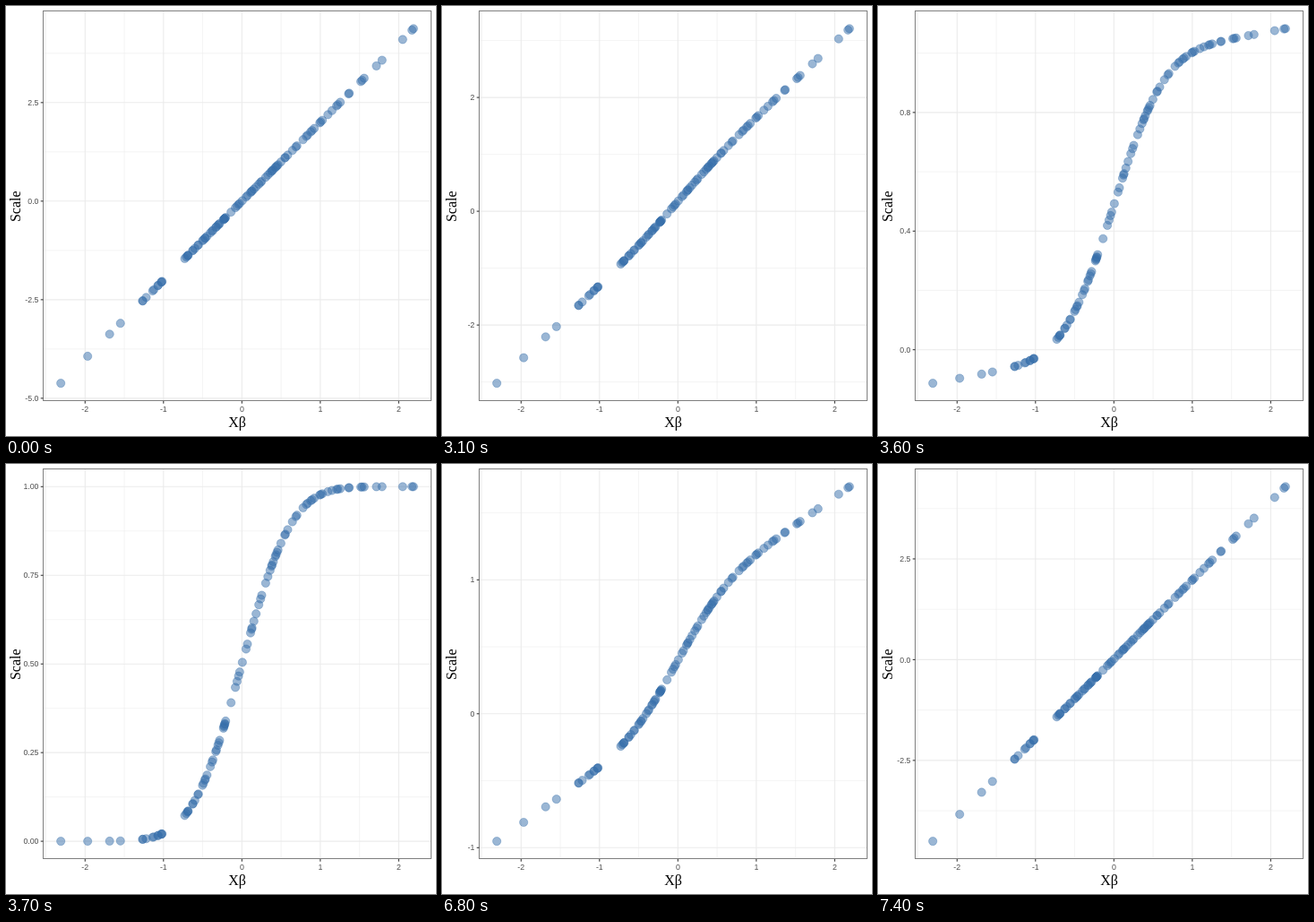
These frames come from a looping animation (480x480 px, 7.5 s). An HTML page with a canvas:

```html
<!DOCTYPE html>
<html lang="en">
<head>
<meta charset="utf-8">
<title>Link scale</title>
<style>
  html, body { margin: 0; width: 100%; height: 100%; overflow: hidden; background: #fff; }
  canvas { display: block; width: 480px; height: 480px; }
</style>
</head>
<body>
<canvas id="plot" width="480" height="480"></canvas>
<script>
const ctx = document.getElementById('plot').getContext('2d');
const panel = { left: 41.5, top: 5.5, right: 474.5, bottom: 440.9 };
const TICK = 2.75;
const STEP_MS = 100, CYCLE = 75, MORPH = 10;

// Seeded Mersenne Twister; the first 227 draws need no wrap-around
function makeRandom(seed) {
  const next = () => (seed = (Math.imul(69069, seed) + 1) >>> 0);
  for (let i = 0; i < 51; i++) next();
  const mt = Array.from({ length: 624 }, next);
  let i = 0;
  return () => {
    const y = (mt[i] & 0x80000000) | (mt[i + 1] & 0x7fffffff);
    let v = mt[i + 397] ^ (y >>> 1) ^ (y & 1 ? 0x9908b0df : 0);
    i++;
    v ^= v >>> 11;
    v ^= (v << 7) & 0x9d2c5680;
    v ^= (v << 15) & 0xefc60000;
    v ^= v >>> 18;
    return (v >>> 0) / 2 ** 32;
  };
}

// Rational approximation of the normal quantile
function normalQuantile(p) {
  const t = Math.sqrt(-2 * Math.log(Math.min(p, 1 - p)));
  const z = t - (2.515517 + t * (0.802853 + t * 0.010328)) /
    (1 + t * (1.432788 + t * (0.189269 + t * 0.001308)));
  return p < 0.5 ? -z : z;
}

const normalCdf = z => 1 / (1 + Math.exp(-1.5976 * z - 0.07056 * z ** 3));

const random = makeRandom(123);
const xs = Array.from({ length: 100 }, () => {
  const big = 2 ** 27;
  return normalQuantile((Math.floor(big * random()) + random()) / big);
});

// Linear scale whose data range is padded by 5% on both sides
function makeScale(values, from, to) {
  const lo = Math.min(...values), hi = Math.max(...values), pad = (hi - lo) * 0.05;
  const min = lo - pad, max = hi + pad;
  const map = v => from + (v - min) / (max - min) * (to - from);
  return { min, max, map, step: niceStep(min, max) };
}

// Break spacing that best balances roundness, coverage and about five labels
function niceStep(min, max) {
  const range = max - min, exp = Math.floor(Math.log10(range));
  let best = 0, bestScore = -Infinity;
  for (const e of [exp - 1, exp]) {
    [1, 5, 2, 2.5, 4, 3].forEach((q, rank) => {
      const step = q * 10 ** e;
      for (const first of [Math.floor(min / step), Math.ceil(min / step)]) {
        for (const last of [Math.floor(max / step), Math.ceil(max / step)]) {
          if (last <= first) continue;
          const lo = first * step, hi = last * step;
          const roundness = 1 - rank / 5;
          const coverage = 1 - 0.5 * ((max - hi) ** 2 + (min - lo) ** 2) / (0.1 * range) ** 2;
          const ratio = (Math.max(hi, max) - Math.min(lo, min)) / step / 4;
          const density = 2 - Math.max(ratio, 1 / ratio);
          const score = 0.25 * roundness + 0.2 * coverage + 0.5 * density;
          if (score > bestScore) [best, bestScore] = [step, score];
        }
      }
    });
  }
  return best;
}

function breaks({ min, max, step }, offset = 0) {
  const list = [];
  for (let i = Math.ceil(min / step - offset); (i + offset) * step <= max; i++) {
    list.push((i + offset) * step);
  }
  return list;
}

function line(x1, y1, x2, y2, color, width) {
  ctx.strokeStyle = color;
  ctx.lineWidth = width;
  ctx.beginPath();
  ctx.moveTo(x1, y1);
  ctx.lineTo(x2, y2);
  ctx.stroke();
}

function drawGrid(sx, sy, offset, width) {
  for (const v of breaks(sy, offset)) {
    line(panel.left, sy.map(v), panel.right, sy.map(v), '#ebebeb', width);
  }
  for (const v of breaks(sx, offset)) {
    line(sx.map(v), panel.top, sx.map(v), panel.bottom, '#ebebeb', width);
  }
}

function dot(x, y) {
  ctx.beginPath();
  ctx.arc(x, y, 4.62, 0, 2 * Math.PI);
  ctx.fill();
  ctx.stroke();
}

function drawBorder() {
  const crisp = v => Math.floor(v) + 0.5;
  const x = crisp(panel.left), y = crisp(panel.top);
  ctx.strokeStyle = '#7f7f7f';
  ctx.lineWidth = 1;
  ctx.strokeRect(x, y, crisp(panel.right) - x, crisp(panel.bottom) - y);
}

function drawAxes(sx, sy) {
  const decimals = (String(sy.step).split('.')[1] || '').length;
  ctx.font = '8.8px "Liberation Sans", Arial, sans-serif';
  ctx.fillStyle = '#4d4d4d';

  ctx.textAlign = 'center';
  for (const v of breaks(sx)) {
    const x = sx.map(v);
    line(x, panel.bottom, x, panel.bottom + TICK, '#333', 1.07);
    ctx.fillText(v.toFixed(0), x, 453);
  }

  ctx.textAlign = 'right';
  for (const v of breaks(sy)) {
    const y = sy.map(v);
    line(panel.left - TICK, y, panel.left, y, '#333', 1.07);
    ctx.fillText(v.toFixed(decimals), 36.5, y + 3.2);
  }
}

function drawTitles() {
  ctx.font = '16px "Liberation Serif", "Times New Roman", serif';
  ctx.fillStyle = '#000';
  ctx.textAlign = 'center';
  ctx.fillText('Xβ', 258, 470);
  ctx.save();
  ctx.translate(16, 223.8);
  ctx.rotate(-Math.PI / 2);
  ctx.fillText('Scale', 0, 0);
  ctx.restore();
}

function draw(stage) {
  const mix = (1 - Math.cos(Math.PI * stage / MORPH)) / 2;
  const ys = xs.map(x => (1 - mix) * 2 * x + mix * normalCdf(2 * x));
  const sx = makeScale(xs, panel.left, panel.right);
  const sy = makeScale(ys, panel.bottom, panel.top);

  ctx.fillStyle = '#fff';
  ctx.fillRect(0, 0, 480, 480);
  drawGrid(sx, sy, 0.5, 0.53);
  drawGrid(sx, sy, 0, 1.07);

  ctx.fillStyle = ctx.strokeStyle = 'rgba(54, 110, 170, 0.5)';
  ctx.lineWidth = 0.71;
  xs.forEach((x, i) => dot(sx.map(x), sy.map(ys[i])));

  drawBorder();
  drawAxes(sx, sy);
  drawTitles();
}

// Rest on the line, morph to the curve, rest, morph back
function stageAt(ms) {
  const n = Math.floor(ms / STEP_MS) % CYCLE;
  return n <= 65 ? Math.min(MORPH, Math.max(0, n - 27)) : CYCLE - n;
}

const start = performance.now();
let shown = -1;
function tick() {
  const stage = stageAt(performance.now() - start);
  if (stage !== shown) draw(shown = stage);
  requestAnimationFrame(tick);
}
tick();
</script>
</body>
</html>
```
